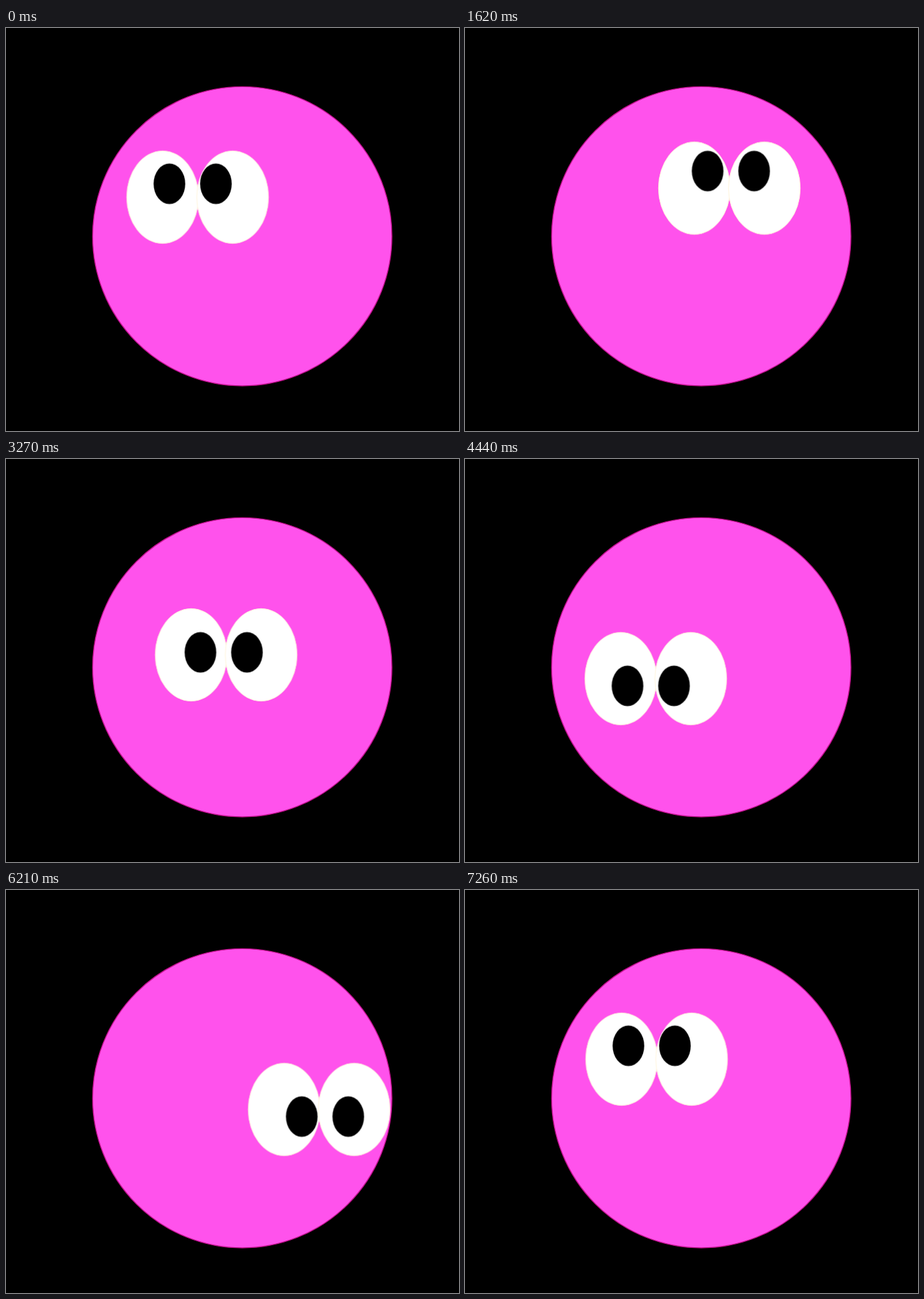
These frames come from a looping animation (682 px wide and 607 px high, 8040 ms). An HTML page:

```html
<!DOCTYPE html>
<html lang="en">
<head>
<meta charset="utf-8">
<title>Looking around</title>
<style>
  html, body { margin: 0; width: 100%; height: 100%; overflow: hidden; background: #000; }
  svg { display: block; width: 682px; height: 607px; }
  .ball { fill: #ff52ec; stroke: #c4128f; stroke-width: 1.4; }
  .eye { fill: #fff; stroke: #fff6dc; stroke-width: 1; }
</style>
</head>
<body>
<svg viewBox="0 0 682 607">
  <circle class="ball" cx="355.7" cy="313.7" r="225.3"/>
  <g id="eyes">
    <ellipse class="eye" cx="-52.7" rx="54" ry="69.7"/>
    <ellipse class="eye" cx="52.7" rx="54" ry="69.7"/>
  </g>
  <g id="pupils">
    <ellipse cx="-35" rx="23.8" ry="30.5"/>
    <ellipse cx="35" rx="23.8" ry="30.5"/>
  </g>
</svg>
<script>
  const LOOP = 8040;
  const topLeft = [288.5, 254.8];
  const topRight = [470, 183];
  const lowLeft = [287, 330.8];
  const lowRight = [471.6, 330.6];

  // Time in ms and the point between the eyes; straight, even moves between stops.
  const stops = [
    [0, topLeft], [510, topLeft],
    [1293, topRight], [2126, lowLeft], [2640, topRight],
    [3473, lowLeft], [4440, lowLeft],
    [5273, lowRight], [6210, lowRight],
    [7030, topLeft], [LOOP, topLeft]
  ];

  // The pupils lead the eyes in the direction of the gaze.
  const gaze = ([x, y]) => [x + (x - 372) * 0.0895, y + 11 + (y - 331) * 0.409];

  function play(id, place) {
    const frames = stops.map(([time, point]) => {
      const [x, y] = place(point);
      return { offset: time / LOOP, transform: `translate(${x}px, ${y}px)` };
    });
    const motion = document.getElementById(id)
      .animate(frames, { duration: LOOP, iterations: Infinity });
    motion.startTime = document.timeline.currentTime;
  }

  play("eyes", point => point);
  play("pupils", gaze);
</script>
</body>
</html>
```
